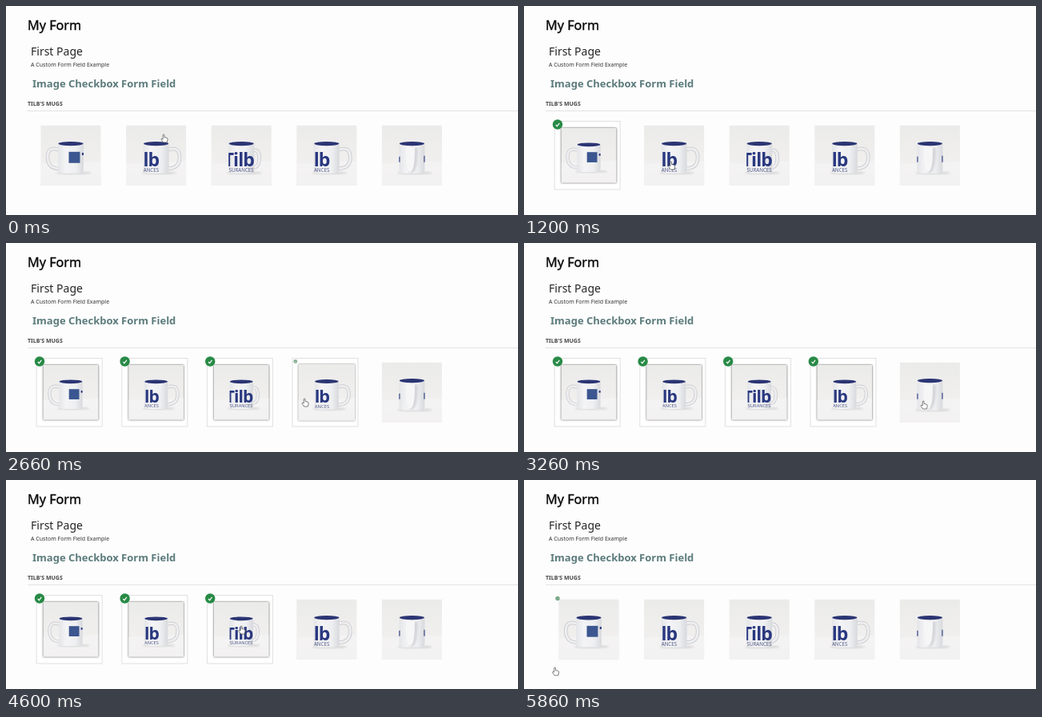
Recreate the animation shown at these times as an HTML page. Size 640 px wide and 262 px high, loop 5930 ms.

```html
<!DOCTYPE html>
<html lang="en">
<head>
<meta charset="utf-8">
<title>Image checkbox form</title>
<style>
  html, body { margin: 0; width: 100%; height: 100%; overflow: hidden; background: #fdfdfd; }
  svg { display: block; }
  text { font-family: "Noto Sans", "Open Sans", sans-serif; }
  .word { font-weight: 700; font-size: 23px; letter-spacing: -1px; fill: #29387f; }
  .sub { font-size: 6.2px; fill: #555d88; }
</style>
</head>
<body>
<svg id="stage" width="640" height="262" viewBox="0 0 640 262">
  <defs>
    <linearGradient id="wall" x2="0" y2="1">
      <stop offset="0" stop-color="#ebebea"/>
      <stop offset=".58" stop-color="#f0efee"/>
      <stop offset=".7" stop-color="#f0efef"/>
      <stop offset="1" stop-color="#e9e8e8"/>
    </linearGradient>
    <linearGradient id="glaze">
      <stop offset="0" stop-color="#e4e5e8"/>
      <stop offset=".3" stop-color="#f4f4f6"/>
      <stop offset=".7" stop-color="#eeeff1"/>
      <stop offset="1" stop-color="#d8d9dd"/>
    </linearGradient>
    <filter id="soft" x="-20%" y="-20%" width="140%" height="140%"><feGaussianBlur stdDeviation="1.3"/></filter>
    <clipPath id="body"><path d="M21.5 22H53.5V55Q53.5 60 48 60H27Q21.5 60 21.5 55Z"/></clipPath>
  </defs>
  <text x="27" y="29.5" font-size="16.2" font-weight="500" fill="#080808" stroke="#080808" stroke-width=".35">My Form</text>
  <text x="31" y="62" font-size="14" fill="#262626">First Page</text>
  <text x="31" y="76.2" font-size="7" fill="#333">A Custom Form Field Example</text>
  <text x="33" y="101.7" font-size="13" font-weight="700" fill="#5c7b7c">Image Checkbox Form Field</text>
  <text x="27" y="124.8" font-size="7" font-weight="600" fill="#444">TILB'S MUGS</text>
  <path d="M27 131.500H640" stroke="#e2e2e2"/>
  <g id="items"></g>
  <circle id="ring" cx="506" cy="201.5" r="5.5" fill="none" stroke="#e0525a" stroke-width=".9"/>
  <path id="hand" d="M-1.800 1V-4Q-1.800 -5 -.9 -5T0 -4V-1.400L3 -.8Q4.300 -.4 4.100 1.300L3.300 5H-1.400L-3.900 1.500Q-4 .1 -3 .3Z"
        fill="#fff" stroke="#4a4a4a" stroke-width=".7" stroke-linejoin="round"/>
</svg>
<script>
const LOOP = 5930, FRAME = 200 / 3, LAST = 88;
const SIZE = 75, PITCH = 106.6, SMALL = 0.915;
const IMAGE_MS = 110, BADGE_MS = 220;

// When each mug is ticked and cleared
const picks = [[560, 5793], [1290, 5160], [1930, 4690], [2618, 4240], [3290, 3755]];

// Pointer stops: time, x, y
const path = [
  [0, 198, 166], [460, 84, 195], [620, 84, 196], [1060, 184, 200], [1320, 185, 200],
  [1750, 284, 203], [1960, 286, 203], [2480, 374, 200], [2680, 374, 200],
  [3180, 500, 203], [3840, 501, 203], [4140, 398, 195], [4270, 396, 194],
  [4560, 295, 188], [4720, 294, 188], [5060, 190, 195], [5200, 188, 196],
  [5600, 84, 202], [5780, 54, 217], [5860, 39.5, 240], [LOOP, 39.5, 240]
];

const sideHandle = 'M53 30Q67 26 67 40T52 54';
const label = (right) => `<g clip-path="url(#body)" text-anchor="end">
  <text class="word" x="${right}" y="51.300">Tilb</text>
  <text class="sub" x="${right}" y="58.300">INSURANCES</text></g>`;

const mugs = [
  { handle: 'M22 30Q8 26 8.500 40T23 54',
    art: '<rect x="35" y="33" width="14" height="14" fill="#3b5690"/>' +
         '<text class="word" clip-path="url(#body)" x="51" y="51.300">T</text>' },
  { handle: sideHandle, art: label(41) },
  { handle: 'M53 31Q60 30 60 41T52 53', art: label(53) },
  { handle: sideHandle, art: label(41) },
  { handle: '',
    art: '<path d="M31 28Q29 59 37 59T45 28Z" fill="#d5d6da" filter="url(#soft)"/>' +
         '<path d="M30 27Q28.500 58 35 58T41 27Z" fill="#f6f6f7"/>' +
         '<path d="M22 39V46M53 38V46" stroke="#4d5a92" stroke-width="1.4"/>' }
];

function mugMarkup({ handle, art }) {
  return `<rect width="75" height="75" fill="url(#wall)"/>
    <path d="M0 48L75 45V75H0Z" fill="#f6f5f5" opacity=".75"/>
    <ellipse cx="41" cy="59.500" rx="22" ry="1.800" fill="#d6d5d5" filter="url(#soft)"/>
    <path d="${handle}" fill="none" stroke="#c6c7cb" stroke-width="4.500"/>
    <path d="${handle}" fill="none" stroke="#eeeef0" stroke-width="3"/>
    <path d="M21.500 22V55Q21.500 60 27 60H48Q53.500 60 53.500 55V22Z" fill="url(#glaze)"/>
    <ellipse cx="37.500" cy="23" rx="16" ry="3.100" fill="#f4f4f5"/>
    <ellipse cx="37.500" cy="22.800" rx="15.600" ry="2.700" fill="#2b3573"/>${art}`;
}

const $ = (id) => document.getElementById(id);
$('items').innerHTML = mugs.map((mug, i) => `
  <g class="item" transform="translate(${43.5 + PITCH * i} 149.800)">
    <rect class="card" x="-5.300" y="-5.300" width="82" height="85.500" fill="#fff" stroke="#e0e0e0"/>
    <g class="photo">
      <rect class="shade" width="75" height="75" fill="#444" filter="url(#soft)"/>${mugMarkup(mug)}
    </g>
    <g class="badge">
      <circle r="6.200"/>
      <path class="check" d="M-2.200 .4L-.7 2.300L2.300 -1.700" fill="none" stroke="#fff" stroke-width="1.200"/>
    </g>
  </g>`).join('');

const items = [...document.querySelectorAll('.item')].map((el) => {
  const part = (name) => el.querySelector('.' + name);
  return { card: part('card'), photo: part('photo'), shade: part('shade'),
           badge: part('badge'), disc: el.querySelector('circle'), check: part('check') };
});

const clamp = (v) => Math.max(0, Math.min(1, v));
const ease = (p) => 1 - (1 - clamp(p)) ** 2;
const mix = (a, b, p) => a + (b - a) * p;

// 0 = cleared, 1 = ticked
function level(t, [on, off], ms) {
  return t < off ? ease((t - on) / ms) : 1 - ease((t - off) / ms);
}

function pointer(t) {
  const n = path.findIndex((p) => p[0] > t);
  const [t0, x0, y0] = path[n - 1], [t1, x1, y1] = path[n];
  const p = (t - t0) / (t1 - t0), s = p * p * (3 - 2 * p);
  return [mix(x0, x1, s), mix(y0, y1, s)];
}

function draw(t) {
  items.forEach((item, i) => {
    const [on, off] = picks[i];
    const ticked = t >= on && t < off;
    const photo = level(t, picks[i], IMAGE_MS), badge = level(t, picks[i], BADGE_MS);
    const scale = mix(1, SMALL, photo), half = SIZE / 2;
    item.card.style.visibility = item.check.style.visibility = ticked ? 'visible' : 'hidden';
    item.photo.setAttribute('transform', `translate(${half} ${half}) scale(${scale}) translate(${-half} ${-half})`);
    item.shade.setAttribute('opacity', photo);
    item.badge.setAttribute('transform', `translate(-1.5 -1.3) scale(${badge})`);
    const [r, g, b] = [[190, 40], [195, 138], [192, 70]].map(([from, to]) => Math.round(mix(from, to, badge)));
    item.disc.setAttribute('fill', `rgb(${r},${g},${b})`);
  });
  $('hand').setAttribute('transform', `translate(${pointer(t).join(' ')})`);
  $('ring').style.visibility = t >= 3730 && t < 3860 ? 'visible' : 'hidden';
}

// The picture advances fifteen times a second
function tick() {
  const t = performance.now() % LOOP;
  draw(Math.min(LAST, Math.floor((t + 7) / FRAME)) * FRAME);
  requestAnimationFrame(tick);
}
tick();
</script>
</body>
</html>
```
